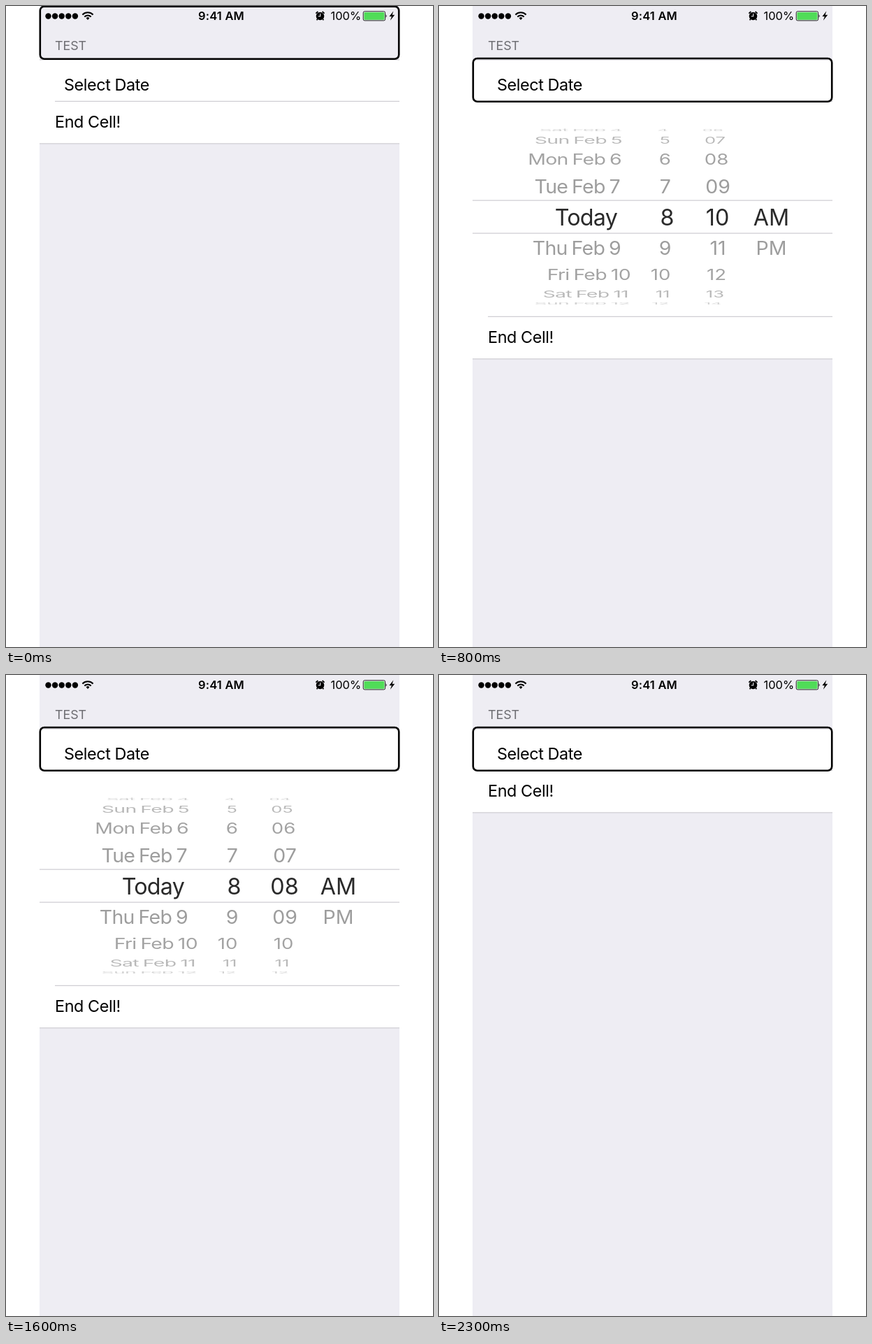
An HTML page for the animation above (2400 ms loop, 611 px wide and 917 px high).

```html
<!DOCTYPE html>
<html lang="en">
<head>
<meta charset="utf-8">
<title>Date picker cell</title>
<style>
  html, body { margin: 0; width: 100%; height: 100%; overflow: hidden; background: #fff; }
  svg { display: block; width: 611px; height: 917px; }
  text { font-family: Inter, Roboto, "Liberation Sans", sans-serif; font-optical-sizing: none; }
  .cell { font-size: 23.35px; letter-spacing: -.017em; }
  .mid { text-anchor: middle; }
  .date { text-anchor: end; letter-spacing: -.025em; word-spacing: -.05em; }
  .hour { text-anchor: end; }
  .line { stroke: #cfced3; stroke-width: 1.3; }
  #cursor { fill: none; stroke: #000; stroke-width: 2.6; }
</style>
</head>
<body>
<svg viewBox="0 0 611 917">
  <rect x="48" width="515" height="917" fill="#eeedf3"/>

  <!-- status bar -->
  <g id="dots"></g>
  <g fill="none" stroke="#000" stroke-width="2.1">
    <path d="M109.4 12.4a10.8 10.8 0 0 1 15.2 0M112.3 15.4a6.7 6.7 0 0 1 9.4 0"/>
    <path d="M114.6 17.3a3.4 3.4 0 0 1 4.8 0L117 20z" fill="#000" stroke="none"/>
  </g>
  <text class="mid" x="308" y="20" font-size="16.5" font-weight="600" letter-spacing=".2">9:41 AM</text>
  <g stroke="#000" fill="none">
    <circle cx="449.5" cy="14.5" r="5.8" fill="#000" stroke="none"/>
    <path d="M443.4 10.6l3-2.6M455.6 10.6l-3-2.6M445.8 18.6l-1.2 1.6M453.2 18.6l1.2 1.6" stroke-width="1.7"/>
    <path d="M449.7 10.8v4h-3" stroke="#eeedf3" stroke-width="1.1"/>
  </g>
  <text class="mid" x="486.3" y="20" font-size="16.5">100%</text>
  <rect x="511.2" y="7.7" width="31.4" height="13.2" rx="2" fill="#eeedf3" stroke="#222"/>
  <rect x="512.4" y="8.9" width="29" height="10.8" rx="1" fill="#50dc58"/>
  <path d="M543.6 12q2 2.3 0 4.6z"/>
  <path d="M554.4 7.2l-6 7.8h3.4l-2 5.8 6.4-8h-3.6z"/>

  <!-- table -->
  <text x="70" y="63" font-size="17.85" fill="#6d6d72">TEST</text>
  <rect id="cells" x="48" y="77" width="515" fill="#fff"/>
  <path class="line" d="M48 76.8H563M70 136.3H563"/>
  <text class="cell" x="83" y="121.3">Select Date</text>
  <g id="picker">
    <path class="line" d="M48 278.2H563M48 325.2H563M70 444.3H563"/>
    <g id="wheels"></g>
    <g id="minutes"></g>
  </g>
  <g id="end">
    <text class="cell" x="70" y="174.3">End Cell!</text>
    <path class="line" d="M48 196.8H563"/>
  </g>
  <rect id="cursor" rx="6"/>
</svg>
<script>
const $ = id => document.getElementById(id);
const OFFSETS = [-4, -3, -2, -1, 0, 1, 2, 3, 4];
const STEP = 20.6 * Math.PI / 180, RADIUS = 125, CENTER = 302;
const GRAYS = ['#2a2a2a', '#9d9d9d', '#a3a3a3', '#b9b9b9', '#d4d4d4'];
const TAPER = [1, 1, .97, .9, .85];

// One label on the wheel, k rows away from the selected one
function label(k, x, str, cls, taper = true) {
  const a = Math.abs(k), size = k ? 28.5 : 32.3;
  const y = CENTER + RADIUS * Math.sin(k * STEP);
  const sx = taper ? TAPER[a] : 1;
  return `<text class="${cls}" y="${size * .364}" font-size="${size}" fill="${GRAYS[a]}"
    transform="translate(${x} ${y}) scale(${sx} ${Math.cos(k * STEP)})">${str}</text>`;
}

const DAYS = ['Sun', 'Mon', 'Tue', 'Wed', 'Thu', 'Fri', 'Sat'];
const dateEdge = [262, 262, 261, 259, 255, 260, 274, 271, 273];
const hourEdge = [328, 331, 332, 332, 336.5, 332.5, 331.5, 330.5, 329];
const minuteX = [392, 395, 397, 399, 398.5, 399, 397, 395, 392];

$('dots').innerHTML = [0, 1, 2, 3, 4].map(i =>
  `<circle cx="${60.5 + i * 9.6}" cy="14.5" r="4.2"/>`).join('');

$('wheels').innerHTML = OFFSETS.map((k, i) => {
  const day = 8 + k;
  const date = k ? `${DAYS[(k + 10) % 7]} Feb ${day}` : 'Today';
  return label(k, dateEdge[i], date, 'date', false) + label(k, hourEdge[i], day, 'hour');
}).join('') + label(0, 475.5, 'AM', 'mid') + label(1, 475.5, 'PM', 'mid');

function setMinute(m) {
  $('minutes').innerHTML = OFFSETS.map((k, i) =>
    label(k, minuteX[i], String(m + k).padStart(2, '0'), 'mid')).join('');
}

// Cursor boxes: x, y, width, height
const HEADER = [48.8, .6, 513.4, 75.2];
const ROW = [48.8, 75, 513.4, 61.8];
const COLUMN = [364, 95.2, 70.2, 412];

// Start time, cursor, picker open, minute
const STATES = [
  [0, HEADER, false, 10],
  [300, ROW, false, 10],
  [800, ROW, true, 10],
  [900, COLUMN, true, 10],
  [1100, COLUMN, true, 9],
  [1300, COLUMN, true, 8],
  [1600, ROW, true, 8],
  [1700, ROW, false, 8],
];

let shown;
function draw() {
  const t = performance.now() % 2400;
  const state = STATES.findLast(s => s[0] <= t);
  if (state !== shown) {
    shown = state;
    const [, box, open, minute] = state;
    ['x', 'y', 'width', 'height'].forEach((name, i) => $('cursor').setAttribute(name, box[i]));
    const shift = open ? 308 : 0;
    $('cells').setAttribute('height', 120 + shift);
    $('end').setAttribute('transform', `translate(0 ${shift})`);
    $('picker').setAttribute('visibility', open ? 'visible' : 'hidden');
    setMinute(minute);
  }
  requestAnimationFrame(draw);
}
draw();
</script>
</body>
</html>
```
